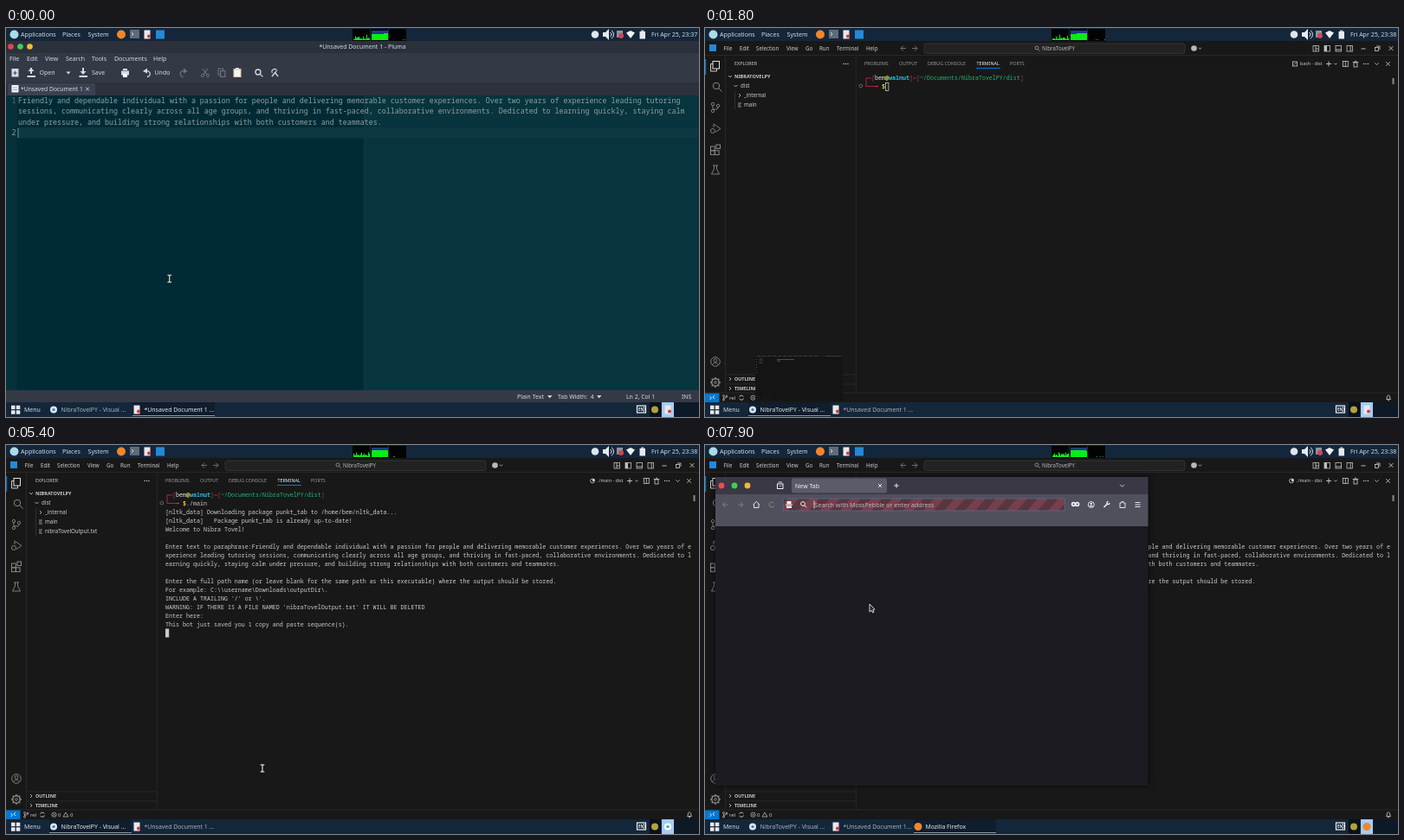
An HTML page with a canvas that plays this animation: 800x450 px, repeating every 8000 ms.

```html
<!DOCTYPE html>
<html lang="en">
<head>
<meta charset="utf-8">
<title>Desktop session</title>
<style>
html, body { margin: 0; width: 100%; height: 100%; overflow: hidden; background: #181818; }
canvas { display: block; }
</style>
</head>
<body>
<canvas id="stage" width="800" height="450"></canvas>
<script>
const g = document.getElementById('stage').getContext('2d');
const LOOP = 8000;
const SANS = '"Noto Sans", "Open Sans", sans-serif';
const MONO = '"Noto Sans Mono", "DejaVu Sans Mono", monospace';
const PROJECT = 'NibraTovelPY';
const OUT_FILE = 'nibraTovelOutput.txt';
const UI = '#d3dae3', DIM = '#6d737f', CODE = '#cccccc', RED = '#c5304c';

// ---------- drawing helpers ----------
function rect(x, y, w, h, color) { g.fillStyle = color; g.fillRect(x, y, w, h); }
function frame(x, y, w, h, color, lw = 1) { g.strokeStyle = color; g.lineWidth = lw; g.strokeRect(x, y, w, h); }
function rounded(x, y, w, h, r, color, edge) {
  g.beginPath(); g.roundRect(x, y, w, h, r);
  g.fillStyle = color; g.fill();
  if (edge) { g.strokeStyle = edge; g.lineWidth = 0.7; g.stroke(); }
}
function dot(x, y, r, color) { g.beginPath(); g.arc(x, y, r, 0, 7); g.fillStyle = color; g.fill(); }
function ring(x, y, r, color, lw = 0.9, a = 0, b = 2 * Math.PI) {
  g.beginPath(); g.arc(x, y, r, a, b); g.strokeStyle = color; g.lineWidth = lw; g.stroke();
}
function trace(p) {
  g.beginPath();
  for (let i = 0; i < p.length; i += 2) g.lineTo(p[i], p[i + 1]);
}
function line(p, color, lw = 0.9) { trace(p); g.strokeStyle = color; g.lineWidth = lw; g.stroke(); }
function poly(p, color) { trace(p); g.fillStyle = color; g.fill(); }
// y is the middle of the capitals
function text(s, x, y, size, color, { font = SANS, weight = 400, align = 'left' } = {}) {
  g.font = `${weight} ${size}px ${font}`;
  g.textAlign = align;
  g.fillStyle = color;
  g.fillText(s, x, y + size * 0.357);
}
function chevron(x, y, dir, color = CODE, r = 2) {
  line(dir === 'down' ? [x - r, y - r / 2, x, y + r / 2, x + r, y - r / 2]
                      : [x - r / 2, y - r, x + r / 2, y, x - r / 2, y + r], color, 0.8);
}
function arrow(x, y, d, color) {
  line([x - 3 * d, y, x + 3 * d, y], color);
  line([x, y - 3, x + 3 * d, y, x, y + 3], color);
}
function cross(x, y, r, color, lw = 0.9) {
  line([x - r, y - r, x + r, y + r], color, lw);
  line([x + r, y - r, x - r, y + r], color, lw);
}
function plus(x, y, r, color) { line([x - r, y, x + r, y], color); line([x, y - r, x, y + r], color); }
function lens(x, y, r, color, lw = 1) {
  ring(x, y, r, color, lw);
  line([x + r * 0.7, y + r * 0.7, x + r * 1.8, y + r * 1.8], color, lw);
}
function dots(x, y, color) { for (const d of [-2.4, 0, 2.4]) dot(x + d, y, 0.7, color); }
function page(x, y) { rect(x - 3.5, y - 5, 7, 10, '#e8e8ea'); dot(x + 2, y + 2, 2, '#e0333f'); }
const noise = n => { const v = Math.sin(n * 127.1) * 43758.5453; return v - Math.floor(v); };

// ---------- desktop panels ----------
function topPanel(t) {
  rect(0, 0, 800, 15, '#14263a');
  dot(9.5, 7.5, 5, '#a9dce8');
  text('Applications', 17, 7.5, 7.1, UI);
  text('Places', 65, 7.5, 7.1, UI);
  text('System', 94.5, 7.5, 7.1, UI);
  dot(133, 7.5, 5, '#f0862b');
  rect(143, 2, 11, 10, '#5f6b76');
  line([145, 5, 147, 7, 145, 9], '#e6eaee');
  page(163, 7.5);
  rect(173, 2.5, 10, 10, '#2489d8');

  const n = Math.floor(t / 250);
  rect(400, 1, 62, 14, '#020403');
  for (let i = 0; i < 19; i++) {
    const k = i + n, h = 1 + 6 * noise(k) * noise(k + 9) + (t > 3000 ? 2 * noise(k + 3) : 0);
    rect(401 + i, 14 - h, 1, h, '#12e51c');
    const m = 7 + Math.round(noise(Math.floor(k / 7)));
    rect(422 + i, 14 - m, 1, m, '#04ef14');
    rect(422 + i, 3, 1, 11 - m, '#26358f');
    if (noise(k + 40) > 0.86) rect(443 + i, 13, 1, 1, '#1c9440');
  }
  line([420.5, 1, 420.5, 15], '#24352f');
  line([441.5, 1, 441.5, 15], '#24352f');

  dot(680, 7.5, 4.3, '#dfe6ec');
  poly([689, 5, 692, 5, 696, 1, 696, 14, 692, 10, 689, 10], '#e6eaee');
  ring(696, 7.5, 3, '#e6eaee', 1, -1, 1);
  ring(696, 7.5, 5.5, '#e6eaee', 1, -1, 1);
  rect(705, 3, 7, 8, '#8795a4');
  dot(710, 9, 3, '#d8434a');
  poly([716, 5.5, 721, 3, 726, 5.5, 721, 12], '#edf1f4');
  rect(731.5, 4, 6.5, 8.5, '#e6eaee');
  rect(733, 2.5, 3.5, 1.5, '#aab3bb');
  text(t < 200 ? 'Fri Apr 25, 23:37' : 'Fri Apr 25, 23:38', 745, 7.5, 7, UI);
}

function task(x, w, label, active, icon) {
  if (active) { rect(x, 433, w, 17, '#0f1d2d'); rect(x, 448, w, 1, '#8d98a3'); }
  icon(x + 5, 441.5);
  text(label, x + 13.5, 441.5, 6.9, active ? '#e6eaee' : '#a9b2bc');
}

function bottomPanel(app) {
  rect(0, 433, 800, 17, '#14263a');
  for (const x of [6, 11.8]) for (const y of [436.7, 442.3]) rect(x, y, 4.5, 4.4, '#e6eaee');
  text('Menu', 21, 441.5, 7, UI);
  const code = (x, y) => { dot(x, y, 4, '#d5e9f6'); dot(x, y, 1.6, '#3d78b5'); };
  const fox = (x, y) => dot(x, y, 4.5, '#f0862b');
  task(50, 95, PROJECT + ' - Visual ...', app === 'code', code);
  task(146, 95, app === 'web' ? '*Unsaved Document 1…' : '*Unsaved Document 1 ...', app === 'edit', page);
  if (app === 'web') task(241, 95, 'Mozilla Firefox', true, fox);

  frame(728.5, 437, 10, 8, '#f0f3f5', 1.2);
  text('EN', 730, 441, 4.5, '#f0f3f5', { weight: 700 });
  line([736, 438, 738, 441, 736, 444], '#f0f3f5');
  rect(743, 433, 13, 17, '#0a111b');
  dot(749, 441.5, 4, '#b3a13c');
  rect(757, 433, 14, 17, '#a5cdf0');
  rect(771, 433, 29, 17, '#0d1927');
  ({ edit: page, code: (x, y) => { dot(x, y, 4, '#fff'); dot(x, y, 1.8, '#5d9ad4'); }, web: fox })[app](764, 441.5);
}

// ---------- text editor ----------
const NOTE = [
  'Friendly and dependable individual with a passion for people and delivering memorable customer experiences. Over two years of experience leading tutoring',
  'sessions, communicating clearly across all age groups, and thriving in fast-paced, collaborative environments. Dedicated to learning quickly, staying calm',
  'under pressure, and building strong relationships with both customers and teammates.'
];

function toolbar(selected) {
  const on = selected ? UI : DIM;
  rect(6.5, 47, 8, 9.5, UI);
  plus(10.5, 52, 2.2, '#343946');
  line([29, 46, 29, 53], UI, 2); poly([25.5, 50, 32.5, 50, 29, 46], UI); rect(24.5, 55, 9.5, 2, UI);
  text('Open', 38.5, 52, 7, UI);
  poly([69.5, 50.5, 74.5, 50.5, 72, 53.5], UI);
  line([89, 46, 89, 53], UI, 2); poly([85.5, 50, 92.5, 50, 89, 54], UI); rect(84.5, 55, 9.5, 2, UI);
  text('Save', 99, 52, 7, UI);
  rect(133, 49.5, 9, 5, UI); rect(135, 47, 5, 2, UI); rect(135, 53, 5, 4, '#fff');
  ring(163, 53, 3.3, UI, 1.2, -1.9, 1.6); poly([158, 50, 163, 46.5, 163, 52.5], UI);
  text('Undo', 171.5, 52, 7, UI);
  ring(204.5, 53, 3.3, DIM, 1.2, 1.5, 5.2); poly([209.5, 50, 205, 46.5, 205, 52.5], DIM);
  line([227, 47, 232, 54], on, 1.1); line([233, 47, 228, 54], on, 1.1);
  ring(227, 55, 1.6, on); ring(233, 55, 1.6, on);
  frame(245, 47, 5.5, 7, on); rect(247, 49, 6.5, 8, on); rect(248.2, 50.2, 4.1, 5.6, '#343946');
  rect(262.5, 47, 9, 10, '#e0c9a0'); rect(263.5, 48.5, 7, 7.5, '#f7f5f0'); rect(265, 46, 4, 2, UI);
  lens(291, 51, 3, UI, 1.3);
  ring(310, 50.5, 3, UI, 1.1, 2.6, 6); line([307, 56, 312, 50], UI, 1.3); line([311, 52, 314, 56], UI, 1.3);
}

function contextMenu(t) {
  g.save();
  g.shadowColor = 'rgba(0,0,0,.5)'; g.shadowBlur = 4;
  rect(177, 104, 68.5, 94, '#343845');
  g.restore();
  const hot = t >= 1200 ? 1 : t >= 1100 ? 0 : -1;
  ['Cut', 'Copy', 'Paste', 'Delete', 'Select All', 'Insert Emoji'].forEach((s, i) => {
    const y = 114 + i * 14.5 + (i > 3 ? 2.2 : 0);
    if (i === hot) rect(177, y - 7, 68.5, 14.5, '#4b94e6');
    text(s, 191.5, y, 7, UI);
  });
  line([178, 165.8, 245, 165.8], '#434857', 0.7);
}

function editor(t) {
  const sel = t >= 200;
  rect(0, 15, 800, 15, '#2c303b');
  dot(5.5, 21.5, 3.3, '#e8434c'); dot(16.5, 21.5, 3.3, '#3fd054'); dot(27.5, 21.5, 3.3, '#eebd3d');
  text('*Unsaved Document 1 - Pluma', 411.5, 22, 6.95, UI, { align: 'center' });
  rect(0, 29, 800, 49, '#343946');
  const menu = { File: 4, Edit: 24, View: 45, Search: 69, Tools: 99, Documents: 125, Help: 170 };
  for (const s in menu) text(s, menu[s], 35.5, 7, UI);
  toolbar(sel);
  rect(0, 63, 800, 15, '#2d313c');
  rect(2, 64, 101, 14, '#3b4150');
  rect(6.5, 66, 8, 8.5, '#f0f1f3'); line([8, 69, 13, 69], '#98a0aa'); line([8, 71.5, 13, 71.5], '#98a0aa');
  text('*Unsaved Document 1', 17, 70.5, 6.75, UI);
  cross(94, 70.5, 1.9, UI);

  rect(0, 78, 800, 341, '#002b36');
  rect(414, 78, 386, 341, '#07343e');
  rect(0, 78, 12.5, 341, '#06313b');
  line([414, 78, 414, 419], '#174650', 0.8);
  if (sel) rect(13, 78, 787, 37.2, '#5f797e');
  else { rect(13, 115, 787, 12.5, '#0d3843'); line([14, 116, 14, 127], '#8fa09f', 0.8); }
  const mono = { font: MONO };
  NOTE.forEach((s, i) => text(s, 14, 84 + i * 12.5, 8.333, sel ? '#052f3a' : '#8fa09f', mono));
  text('1', 6.5, 84, 8.333, sel ? '#9fb0b0' : '#5f777c', mono);
  text('2', 6.5, 121.5, 8.333, sel ? '#5f777c' : '#8fa09f', mono);

  rect(0, 419, 800, 14, '#343946');
  text('Plain Text', 590, 426.5, 6.9, UI);
  poly([625, 425, 630.5, 425, 627.8, 428.2], UI);
  text('Tab Width:  4', 637, 426.5, 6.9, UI);
  poly([682, 425, 687.5, 425, 684.8, 428.2], UI);
  text(sel ? 'Ln 1, Col 1' : 'Ln 2, Col 1', 716, 426.5, 6.9, UI);
  text('INS', 780, 426.5, 6.9, UI);
  if (t >= 900 && t < 1400) contextMenu(t);
}

// ---------- code window ----------
const PATH_PROMPT = [
  'Enter the full path name (or leave blank for the same path as this executable) where the output should be stored.',
  'For example: C:\\\\username\\Downloads\\outputDir\\.',
  "INCLUDE A TRAILING '/' or \\'.",
  `WARNING: IF THERE IS A FILE NAMED '${OUT_FILE}' IT WILL BE DELETED`,
  'Enter here: '
];
const COLS = 152;
const rowY = i => 58 + i * 9.97;

function term(s, col, row, color = CODE, weight = 400) {
  text(s, 184 + col * 4, rowY(row), 6.667, color, { font: MONO, weight });
}

function terminal(t) {
  line([188, 58, 186, 58, 186, 67.5, 199, 67.5], RED, 0.8);
  line([188, 58, 192, 58], RED, 0.8);
  line([197, 67.5, 200, 67.5], RED, 1.4);
  const path = `~/Documents/${PROJECT}/dist`;
  term('[', 2, 0, RED);
  term('bem', 3, 0, '#e8e8e8');
  term('@', 6, 0, '#e5d02b', 700);
  term('walnut', 7, 0, '#35b8e0', 700);
  term(']', 13, 0, RED);
  line([240, 58, 244, 58], RED, 0.8);
  term('[', 15, 0, RED);
  term(path, 16, 0, '#22b573');
  term(']', 16 + path.length, 0, RED);
  term('$', 5, 1, '#f0de4a', 700);
  ring(179.8, 67, 1.9, '#777', 0.8);

  const typed = './main'.slice(0, Math.max(0, Math.floor((t - 2400) / 100)));
  term(typed, 6, 1);
  let col = 6 + typed.length, row = 1;
  const out = [];
  if (t >= 3200) out.push('[nltk_data] Downloading package punkt_tab to /home/bem/nltk_data...');
  if (t >= 3400) out.push('[nltk_data]   Package punkt_tab is already up-to-date!');
  if (t >= 3500) out.push('Welcome to Nibra Tovel!');
  if (t >= 3600) {
    const ask = 'Enter text to paraphrase:' + (t >= 4400 ? NOTE.join(' ') : '');
    out.push('');
    for (let i = 0; i < ask.length; i += COLS) out.push(ask.substr(i, COLS));
  }
  if (t >= 4400) out.push('', ...PATH_PROMPT);
  if (t >= 4900) out.push('This bot just saved you 1 copy and paste sequence(s).', '');
  out.forEach((s, i) => term(s, 0, i + 2));
  if (out.length) {
    row = out.length + 1;
    col = t < 3600 ? 0 : out[out.length - 1].length;
    if (t < 3600) row++;
  }
  const x = 184 + col * 4, y = rowY(row) - 5;
  if (t < 2200) frame(x + 0.5, y + 0.5, 3.4, 9, '#c8c8c8', 0.8);
  else rect(x, y, 4.2, 10, '#c8c8c8');
}

function activityBar() {
  const c = '#868686';
  rect(0, 36, 1.2, 18, '#0078d4');
  frame(9, 38.5, 7.5, 8.5, '#e0e0e0'); line([9, 41.5, 6.5, 41.5, 6.5, 50, 13.5, 50, 13.5, 47], '#e0e0e0');
  lens(13, 67, 3.7, c);
  ring(9, 88, 1.7, c); ring(9, 96, 1.7, c); ring(15, 90, 1.7, c);
  line([9, 90, 9, 94], c); line([15, 92, 14, 94, 9.5, 94], c);
  line([10, 115, 10, 111, 18, 116.5, 12, 120.5], c); ring(9, 119, 2.5, c);
  frame(6.5, 137, 4.8, 4.8, c); frame(6.5, 141.8, 4.8, 4.8, c); frame(11.3, 141.8, 4.8, 4.8, c); frame(13, 135, 4.5, 4.5, c);
  line([10.5, 159, 10.5, 163, 7.5, 169, 16.5, 169, 13.5, 163, 13.5, 159], c); line([9, 159, 15, 159], c);
  ring(12, 386, 5.3, c); ring(12, 384.5, 1.9, c); ring(12, 391, 3.6, c, 0.9, 3.5, 5.9);
  ring(12, 410, 4.2, c, 1.5); ring(12, 410, 1.4, c);
  for (let i = 0; i < 8; i++) {
    const a = i * Math.PI / 4, u = Math.cos(a), v = Math.sin(a);
    line([12 + u * 4, 410 + v * 4, 12 + u * 6, 410 + v * 6], c, 1.4);
  }
}

function explorer(t) {
  text('EXPLORER', 34, 41.5, 5.4, CODE);
  dots(162.5, 41.5, CODE);
  chevron(29, 56, 'down');
  text(PROJECT.toUpperCase(), 34, 56, 5.5, CODE, { weight: 700 });
  chevron(35.5, 67, 'down');
  text('dist', 41, 67, 6.2, CODE);
  line([34.5, 73, 34.5, t >= 5200 ? 105 : 94], '#3d3d3d', 0.7);
  chevron(40, 78, 'right');
  text('_internal', 45, 78, 6.2, CODE);
  const files = t >= 5200 ? ['main', OUT_FILE] : ['main'];
  files.forEach((s, i) => {
    const y = 89 + i * 11;
    for (const d of [-2, 0, 2]) line([38, y + d, d ? 42 : 41, y + d], '#b5b5b5', 0.8);
    text(s, 45, y, 6.2, CODE);
  });
  ['OUTLINE', 'TIMELINE'].forEach((s, i) => {
    line([24, 401 + 11 * i, 174, 401 + 11 * i], '#2b2b2b', 0.8);
    chevron(29, 406 + 11 * i, 'right');
    text(s, 34, 406.3 + 11 * i, 5.4, CODE, { weight: 700 });
  });
}

function codeWindow(t) {
  rect(0, 15, 800, 418, '#181818');
  rect(5, 19, 8, 8, '#2489d8');
  const menu = { File: 21.5, Edit: 40, Selection: 59, View: 94, Go: 116, Run: 132, Terminal: 152, Help: 186 };
  for (const s in menu) text(s, menu[s], 23.7, 6.2, CODE);
  arrow(229, 23.5, -1, '#7a7a7a'); arrow(242, 23.5, 1, '#7a7a7a');
  rounded(253, 18, 301, 11.5, 2.5, '#222222', '#3c3c3c');
  lens(383, 23, 2, '#a0a0a0', 0.8);
  text(PROJECT, 389, 23.7, 6.2, '#b8b8b8');
  dot(564.5, 23.5, 3.3, '#b8b8b8'); chevron(571.5, 23.5, 'down', CODE, 1.6);
  [705, 718, 731, 744].forEach((x, i) => {
    frame(x - 3, 20.5, 6.5, 6.5, '#c0c0c0', 0.8);
    if (i === 0) { line([x, 20.5, x, 27], '#c0c0c0'); line([x, 24, x + 3, 24], '#c0c0c0'); }
    if (i === 1) rect(x - 3, 20.5, 3, 6.5, '#c0c0c0');
    if (i === 2) line([x - 3, 25, x + 3.5, 25], '#c0c0c0');
    if (i === 3) line([x + 1.2, 20.5, x + 1.2, 27], '#c0c0c0');
  });
  line([757.5, 24, 762.5, 24], CODE);
  frame(773.5, 22.5, 4, 4, CODE, 0.8); line([775, 21, 779, 21, 779, 25], CODE, 0.8);
  cross(792, 23.5, 2.4, CODE);
  line([0, 31.5, 800, 31.5], '#2b2b2b', 0.8);
  line([23.5, 31.5, 23.5, 422], '#2b2b2b', 0.8);
  line([174.3, 31.5, 174.3, 422], '#2b2b2b', 0.8);
  activityBar();
  explorer(t);

  const tabs = { PROBLEMS: 184, OUTPUT: 224, 'DEBUG CONSOLE': 257, TERMINAL: 313.5, PORTS: 352 };
  for (const s in tabs) text(s, tabs[s], 41.5, 5.35, s === 'TERMINAL' ? '#f0f0f0' : '#9d9d9d');
  rect(313, 46, 28, 1, '#0078d4');
  const running = t >= 3100;
  if (running) { ring(677, 41.5, 2.4, CODE, 0.8); rect(677, 39, 2.5, 3, CODE); }
  else { frame(678.5, 39, 5, 5, CODE, 0.8); line([680, 42.5, 682.5, 40], CODE, 0.8); }
  text(running ? './main - dist' : 'bash - dist', 712.5, 41.5, 5.3, CODE, { align: 'right' });
  plus(720, 41.5, 3, CODE);
  chevron(728, 41.5, 'down', CODE, 1.6);
  frame(736.3, 38.5, 6, 6, CODE, 0.8); line([739.3, 38.5, 739.3, 44.5], CODE, 0.8);
  frame(749, 40, 4, 5, CODE, 0.8); line([747.7, 39.5, 754.3, 39.5], CODE, 0.8); line([750, 38.2, 752, 38.2], CODE, 0.8);
  dots(763, 41.5, CODE);
  chevron(775.5, 41.5, 'down', CODE, 2.2);
  cross(788.5, 41.5, 2.2, CODE);
  rect(793.5, 58, 2, 7, '#8a8a8a');
  terminal(t);

  line([0, 422, 800, 422], '#2b2b2b', 0.8);
  rect(0, 422.5, 16.5, 10.5, '#0078d4');
  line([5.5, 426, 7.5, 428, 5.5, 430], '#fff', 0.8); line([11, 425, 9, 427, 11, 429], '#fff', 0.8);
  ring(21.5, 425.5, 1, CODE, 0.7); ring(21.5, 430, 1, CODE, 0.7); ring(25, 426, 1, CODE, 0.7);
  line([21.5, 426.5, 21.5, 429], CODE, 0.7); line([25, 427, 22, 428.5], CODE, 0.7);
  text('rel', 28, 427.7, 6, CODE);
  ring(42, 427.7, 2.6, CODE, 0.9, 0.3, 2.7); ring(42, 427.7, 2.6, CODE, 0.9, 3.5, 5.8);
  ring(55.5, 427.7, 2.6, CODE, 0.7); cross(55.5, 427.7, 1, CODE, 0.7);
  text('0', 60, 427.7, 6, CODE);
  line([66, 430, 69, 425, 72, 430, 66, 430], CODE, 0.7);
  text('0', 74, 427.7, 6, CODE);
  line([786.5, 429.5, 787.3, 428, 787.3, 426, 789, 424.6, 790.7, 426, 790.7, 428, 791.5, 429.5, 786.5, 429.5], CODE, 0.8);
  dot(789, 430.6, 0.8, CODE);
}

function preview() {
  rect(58, 378, 101, 53, 'rgba(20,20,20,.93)');
  rect(58, 379, 101, 1, '#20262c');
  for (let x = 60; x < 128; x += 6) rect(x, 379, 4, 0.7, '#4a4a4a');
  rect(139, 379, 18, 0.7, '#4a4a4a');
  for (let i = 0; i < 5; i++) rect(62.5, 381.5 + i * 1.5, 3 + i % 3, 0.6, '#484848');
  rect(83, 383.2, 20, 0.8, '#43685a');
  rect(83, 384.8, 4, 0.6, '#777');
  for (let i = 0; i < 6; i++) rect(59, 383 + i * 3, 1, 1, '#4a4a4a');
}

// ---------- browser ----------
function browser(t) {
  g.save();
  if (t < 7600) {
    g.globalAlpha = 0.6;
    g.translate(262, 215); g.scale(0.95, 0.95); g.translate(-262, -215);
  }
  g.shadowColor = 'rgba(0,0,0,.7)'; g.shadowBlur = 6;
  rect(12, 37, 499.5, 357, '#1c1b22');
  g.shadowBlur = 0; g.shadowColor = 'transparent';
  rect(12, 37, 499.5, 20, '#393844');
  rect(12, 57, 499.5, 37, '#50505d');
  dot(19, 47, 3.4, '#ee4b51'); dot(34, 47, 3.4, '#3ad152'); dot(49, 47, 3.4, '#efb83c');
  if (t >= 7600) {
    const c = '#f2f2f5';
    frame(83.5, 45, 6.5, 5.5, c); line([84.5, 43, 89, 43], c); chevron(86.8, 47.5, 'down', c, 1.2);
    rounded(100, 38.5, 110, 17, 2, '#5b5b69');
    text('New Tab', 104, 47.3, 7, c);
    cross(202, 47, 2, c); plus(221, 47, 2.7, c); chevron(481.5, 47, 'down', c, 2.5);
    arrow(23.5, 69, -1, '#85858f'); arrow(41, 69, 1, '#85858f');
    line([55.5, 69, 59.3, 65.5, 63, 69], c); line([56.5, 68.5, 56.5, 72.5, 62, 72.5, 62, 68.5], c);
    ring(77, 69, 3, '#85858f', 1, 0.3, 5.6);
    g.save();
    g.beginPath(); g.roundRect(90, 62, 325.5, 14, 2); g.clip();
    rect(90, 62, 326, 14, '#573641');
    for (let x = 84; x < 420; x += 24) poly([x, 76, x + 12, 62, x + 24, 62, x + 12, 76], '#75404c');
    g.restore();
    g.setLineDash([1.5, 1]);
    frame(90.3, 62, 325, 14, '#4c83bd', 0.8);
    g.setLineDash([]);
    rect(94.5, 65, 5, 3.5, c); rect(93, 68.7, 8, 1, c); rect(94, 70.5, 6, 2.5, c);
    lens(113, 68, 2.4, c);
    line([126, 64.5, 126, 73.5], '#fff', 0.8);
    text('Search with MossPebble or enter address', 126.5, 69.2, 7.1, '#c3b6bd');
    ring(425.5, 68.5, 1.9, c, 1.6); ring(429.7, 68.5, 1.9, c, 1.6);
    ring(445.8, 69, 3.5, c); dot(445.8, 68, 1.2, c); rect(444, 70, 3.6, 1.2, c);
    line([460.5, 72, 465, 67.5], c, 1.6); ring(465.5, 67, 1.6, c, 1.2, 0, 4.7);
    line([479, 67, 481, 67, 481, 65.5, 483, 65.5, 483, 67, 485, 67, 485, 72.5, 479, 72.5, 479, 67], c);
    for (const y of [66.5, 69, 71.5]) line([496.5, y, 502.5, y], c);
  }
  g.restore();
}

// ---------- pointer ----------
const MOVES = [
  [0, 188.7, 290], [400, 188.7, 290], [700, 174, 103], [1000, 176, 103], [1200, 196, 130], [1400, 192, 170],
  [1700, 66, 438], [1800, 66, 438], [1900, 250, 330], [2000, 373.5, 231], [3700, 373.5, 231], [4200, 398.7, 297],
  [4400, 398.7, 297], [4500, 300, 371], [5200, 300, 371], [5600, 292, 377], [6000, 284, 372],
  [7200, 284, 372], [7700, 212, 290], [7800, 212, 290], [7900, 190, 184], [8000, 190, 184]
];

function pointer(t) {
  if (t === 1800) return;
  let i = 0;
  while (i < MOVES.length - 2 && t >= MOVES[i + 1][0]) i++;
  const [t0, x0, y0] = MOVES[i], [t1, x1, y1] = MOVES[i + 1], k = (t - t0) / (t1 - t0);
  const x = x0 + (x1 - x0) * k, y = y0 + (y1 - y0) * k;
  if ((t >= 900 && t < 1900) || t >= 7600) {
    const tip = [x, y, x, y + 9, x + 2.2, y + 7.3, x + 3.7, y + 10, x + 5, y + 9.2, x + 3.8, y + 6.7, x + 6, y + 6, x, y];
    poly(tip, '#26282c');
    line(tip, '#e6e6e6', 0.9);
  } else {
    for (const [c, w] of [['#111', 2.6], ['#e6e6e6', 1.2]]) {
      line([x, y - 4, x, y + 4], c, w);
      line([x - 2.3, y - 4, x + 2.3, y - 4], c, w);
      line([x - 2.3, y + 4, x + 2.3, y + 4], c, w);
    }
  }
}

function draw(t) {
  if (t < 1800) editor(t); else codeWindow(t);
  if (t >= 7500) browser(t);
  topPanel(t);
  bottomPanel(t < 1800 ? 'edit' : t < 7500 ? 'code' : 'web');
  // the tray switches one step after the window
  if (t === 1800) { rect(757, 433, 14, 17, '#a5cdf0'); page(764, 441.5); }
  if (t >= 1700 && t < 1900) preview();
  pointer(t);
}

const start = performance.now();
function tick() {
  const t = (performance.now() - start) % LOOP;
  draw(Math.floor(t / 100) * 100);
  requestAnimationFrame(tick);
}
tick();
</script>
</body>
</html>
```
